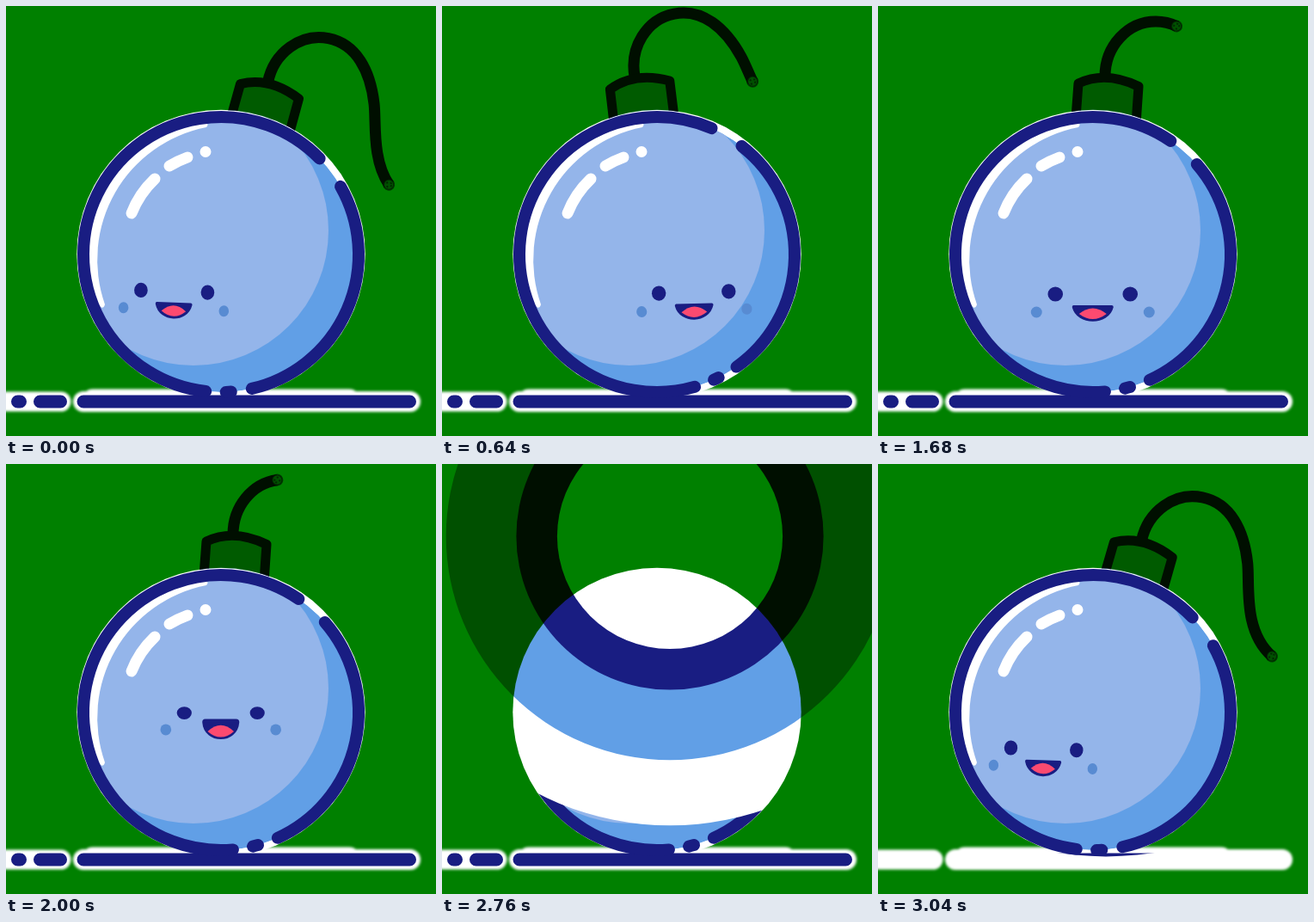
An HTML page for the animation above (3080 ms loop, 500 by 500 pixels).

```html
<!DOCTYPE html>
<html lang="en">
<head>
<meta charset="utf-8">
<title>Bomb</title>
<style>
  html, body { margin: 0; width: 100%; height: 100%; overflow: hidden; background: #008000; }
  svg { display: block; width: 100%; height: 100%; }
  #ink { mix-blend-mode: multiply; }
  .line { fill: none; stroke: #191d82; stroke-linecap: round; stroke-linejoin: round; }
  .navy { fill: #191d82; }
</style>
</head>
<body>
<svg viewBox="0 0 500 500">
  <defs>
    <filter id="soft" filterUnits="userSpaceOnUse" x="-30" y="420" width="560" height="80">
      <feGaussianBlur stdDeviation="1.8"/>
    </filter>
    <clipPath id="inside"><circle cx="250" cy="289" r="160"/></clipPath>
    <clipPath id="reveal"><circle id="hole" cx="265" cy="84" r="999"/></clipPath>
  </defs>

  <rect width="500" height="500" fill="#008000"/>
  <g fill="none" stroke="#fff" stroke-linecap="round">
    <g filter="url(#soft)">
      <path d="M0 460H64" stroke-width="23"/>
      <path d="M90 460H470" stroke-width="24"/>
      <path d="M100 456H400" stroke-width="21"/>
    </g>
    <circle cx="250" cy="288.5" r="167.7" fill="#fff" stroke="none"/>
  </g>

  <g id="ink">
    <rect width="500" height="500" fill="#fff"/>
    <g id="scene" clip-path="url(#reveal)">
      <g id="top">
        <g id="cap">
          <path id="fuse" class="line" d="M264 90V82A59 64 0 0 1 323 18C356 18 378 45 390 82C398 107 401 160 440 182" stroke-width="13" style="stroke-linecap:butt"/>
          <g id="spark">
            <circle r="6" fill="#8fa0b8" stroke="#191d82" stroke-opacity=".6" stroke-width="2"/>
            <circle id="grit" r="3" fill="none" stroke="#46506e" stroke-width="2" stroke-dasharray="2 3"/>
          </g>
          <path class="line" d="M228.5 150L233 90Q265 75 303 93.5L299 152" stroke-width="11" style="fill:#94b5ea"/>
        </g>
      </g>
      <circle cx="250" cy="288.5" r="167.5" fill="#fff"/>
      <path class="line" d="M13.5 460H16.5M39.5 460H63.5M90 460H469.5" stroke-width="15"/>
      <g clip-path="url(#inside)">
        <circle cx="250" cy="289" r="160" fill="#619fe6"/>
        <circle cx="218" cy="261" r="157" fill="#94b5ea"/>
      </g>
      <path fill="#fff" d="M233 136A154 154 0 0 0 108 348Q113 354 115 347A157 157 0 0 1 233 141Q236 138 233 136"/>
      <path class="line" d="M146 241Q155 218 173 201M190 186Q200 180 211 176M232 169.5h.01" stroke-width="13" style="stroke:#fff"/>
      <path id="ring" class="line" stroke-width="14"/>
      <g id="face">
        <ellipse class="navy eye" cx="-43.5"/>
        <ellipse class="navy eye" cx="43.5"/>
        <circle class="cheek" cx="-65.5" r="6.5" fill="#588bd2"/>
        <circle class="cheek" cx="65.5" r="6.5" fill="#588bd2"/>
        <g id="mouth">
          <path id="lips" class="line" style="fill:#191d82"/>
          <path id="tongue" d="M-16 1Q0 -12 16 1Q0 13 -16 1" fill="#fc4a70"/>
        </g>
      </g>
    </g>
    <g id="blast"></g>
  </g>
</svg>
<script>
const LOOP = 3080, STEP = 40, SPEED = 1.9, REVEAL = 2844;
const $ = id => document.getElementById(id);
const [ink, scene, blast, hole, cap, fuse, spark, face] =
  ['ink', 'scene', 'blast', 'hole', 'cap', 'fuse', 'spark', 'face'].map($);
const eyes = document.querySelectorAll('.eye');
const cheeks = document.querySelectorAll('.cheek');
const fuseLength = fuse.getTotalLength();

const set = (el, attrs) => { for (const k in attrs) el.setAttribute(k, attrs[k]); };
const mix = (a, b, k) => a + (b - a) * k;
const clamp = x => Math.min(1, Math.max(0, x));
const ease = (t, from, to) => (1 - Math.cos(Math.PI * clamp((t - from) / (to - from)))) / 2;

// One swing from a to b, then back to rest.
const swing = (t, a, b, turn) =>
  t < turn ? mix(a, b, ease(t, -80, turn)) : b * (1 - ease(t, turn, 1680));

function arc(from, to) {
  const at = deg => {
    const r = deg * Math.PI / 180;
    return `${250 + 160 * Math.cos(r)} ${289 + 160 * Math.sin(r)}`;
  };
  return `M${at(from)}A160 160 0 ${to - from > 180 ? 1 : 0} 1 ${at(to)}`;
}
$('ring').setAttribute('d', arc(-41, 65.7) + arc(74.4, 76.6) + arc(85, 304.4));

const waves = [[2583, '#fff'], [2623, '#619fe6'], [2666, '#191d82'], [2691, '#fff']].map(([start, fill]) => {
  const el = document.createElementNS('http://www.w3.org/2000/svg', 'circle');
  set(el, { cx: 265, cy: 84, r: 0, fill });
  blast.append(el);
  return { el, start };
});

function drawFuse(t) {
  const left = Math.min(fuseLength, 301 - t * (t < 0 ? 0.55 : 0.102));
  fuse.setAttribute('stroke-dasharray', `${left} 999`);
  const tip = fuse.getPointAtLength(left);
  spark.setAttribute('transform', `translate(${tip.x} ${tip.y}) rotate(${t * 1.7})`);
}

function drawFace(t) {
  const shift = swing(t, -58.5, 44, 545);
  const up = ease(t, 1720, 2240);
  const blink = 1 - 0.72 * (1 - ease(Math.abs(t - 280), 0, 120));
  const width = Math.sqrt(1 - (shift / 120) ** 2) * mix(1, 0.957, up);
  const y = mix(345, 262, up) - shift * shift * 0.0011;
  face.setAttribute('transform',
    `translate(${249.75 + shift} ${y}) rotate(${-shift / 28}) scale(${width} 1)`);
  eyes.forEach(el => set(el, { cy: mix(-10, -8, up), rx: 8.8, ry: mix(8.6, 6.5, up) * blink }));
  cheeks.forEach(el => set(el, { cy: mix(11, 10, up) }));

  const w = mix(22, 15.5, up), lip = mix(-7, -8.5, up), chin = mix(12.7, 14.8, up), bend = mix(17, 16.5, up);
  $('mouth').setAttribute('transform', `translate(0 ${mix(12, 7.5, up)})`);
  set($('lips'), {
    d: `M${-w} ${lip}H${w}C${bend} ${chin} ${-bend} ${chin} ${-w} ${lip}Z`,
    'stroke-width': mix(4, 10, up)
  });
  $('tongue').setAttribute('transform', `translate(0 ${3.3 * up}) scale(${mix(1, 0.96, up)} ${mix(1, 1.2, up)})`);
}

function draw(time) {
  const opening = time >= REVEAL;
  const t = opening ? time - LOOP : time;
  if (opening !== (ink.lastElementChild === scene)) ink.append(opening ? scene : blast);
  hole.setAttribute('r', opening ? (time - REVEAL) * SPEED : 999);
  waves.forEach(w => w.el.setAttribute('r', Math.max(0, (time - w.start) * SPEED)));

  const turn = swing(t, 12.1, -11, 620);
  const sink = 18 * ease(t, 2200, 2360);
  $('top').setAttribute('transform', `rotate(${turn} 250 289)`);
  $('ring').setAttribute('transform', `rotate(${turn} 250 289)`);
  cap.setAttribute('transform', `translate(${-sink / 14} ${sink})`);
  drawFuse(t);
  drawFace(t);
}

const began = performance.now();
function tick() {
  const t = (performance.now() - began) % LOOP;
  draw(Math.floor(t / STEP) * STEP);
  requestAnimationFrame(tick);
}
tick();
</script>
</body>
</html>
```
